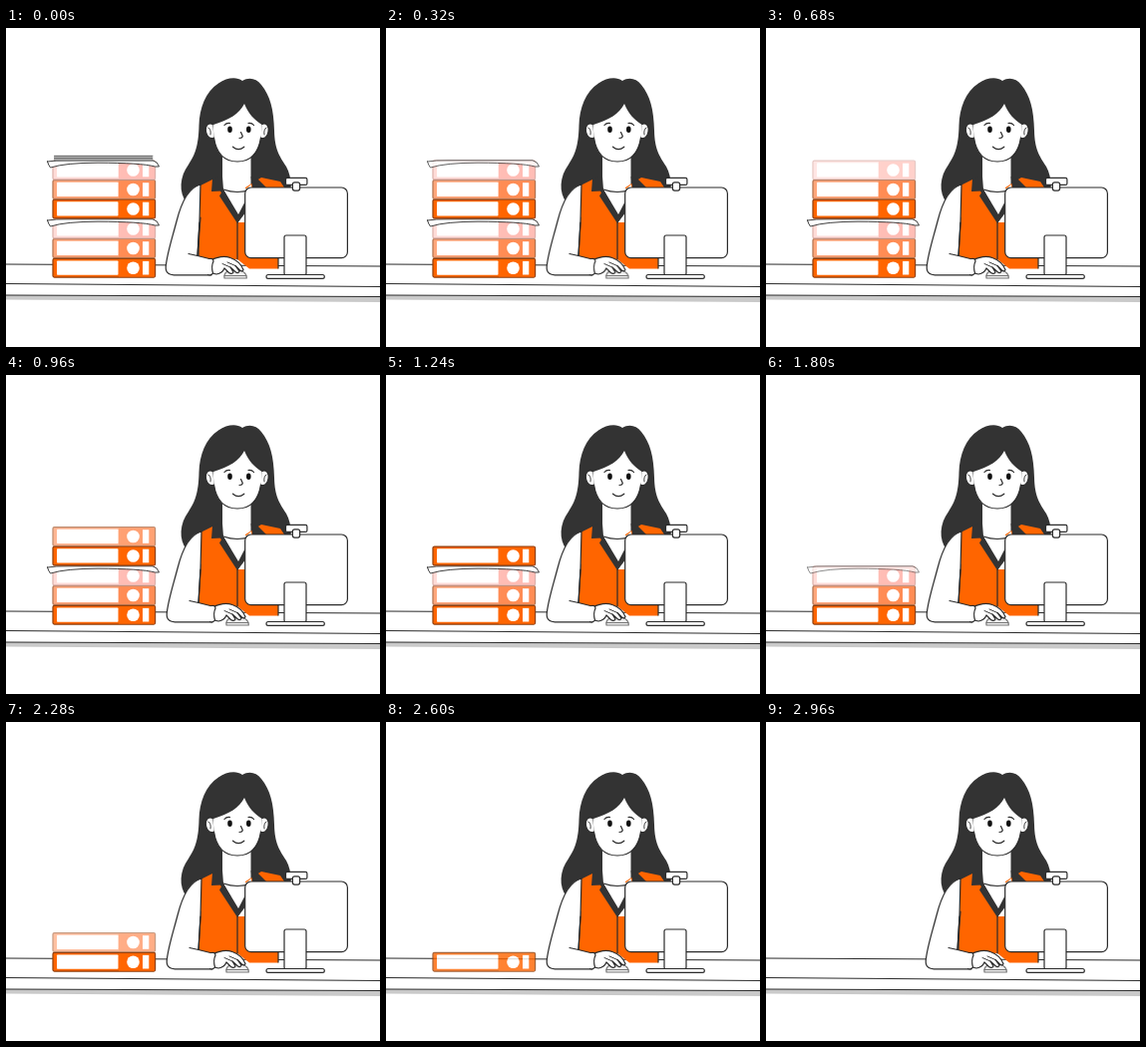
Animation of 375x320 px, one loop 3000 ms. Source, as an HTML page without scripts:

```html
<!DOCTYPE html>
<html lang="en">
<head>
<meta charset="utf-8">
<title>Clearing the desk</title>
<style>
html, body { margin: 0; width: 100%; height: 100%; overflow: hidden; background: #fff; }
svg { display: block; width: 375px; height: 320px; }
.ink { fill: none; stroke: #2b2b2b; stroke-width: 1.2; stroke-linecap: round; stroke-linejoin: round; }
.thin { stroke-width: .9; }
.paper { fill: #fff; }
.dark { fill: #333; }
.eye { fill: #111; }
.vest { fill: #ff6500; }
.mouse { fill: #eee; stroke: #777; }
.full { --body: #ff6500; --spine: #ff6500; --edge: #8f3d08; }
.mid { --body: #ffa77c; --spine: #ff8c54; --edge: #b0704c; }
.pale { --body: #ffdcd8; --spine: #ffbdb5; --edge: #dcb0aa; }
.body { fill: var(--body); stroke: var(--edge); stroke-width: 1.2; }
.spine { fill: var(--spine); }
.arm { animation: slide 3s infinite; --dx: 1px; }
.hand { animation: slide 3s infinite; --dx: 2px; }
@keyframes slide {
  0% { transform: none; animation-timing-function: ease-in-out; }
  14%, 88% { transform: translateX(var(--dx)); animation-timing-function: ease-in-out; }
  98.5%, 100% { transform: none; }
}
</style>
</head>
<body>
<svg viewBox="0 0 375 320">
  <defs>
    <g id="binder">
      <rect class="body" x="47" y=".6" width="102.6" height="18.8" rx="1.5"/>
      <rect class="spine" x="113" y="1.2" width="36" height="17.6"/>
      <rect class="paper" x="51" y="2.8" width="61.5" height="14.2" rx=".8"/>
      <circle class="paper" cx="127.5" cy="10" r="6.3"/>
      <rect class="paper" x="137" y="3.2" width="6.3" height="13.6"/>
    </g>
    <path id="sheet" class="ink paper thin" d="M41.500 1.500Q50 0 62 .3L147 .3Q152 1.500 153.500 6.500L149.500 6.500Q135 2.700 92 2.700Q60 2.700 44.500 7.500Q42.500 5 41.500 1.500Z"/>
  </defs>

  <!-- desk -->
  <path fill="#c9c9c9" d="M0 268L375 269.500V275L0 272.500Z"/>
  <path class="ink paper" d="M-2 237L377 239V269.500L-2 268Z"/>
  <path class="ink" d="M-2 256.500L377 259.500"/>

  <!-- hair, neck and face -->
  <path class="dark" d="M237 53C231 48.500 221 50 213 55.500C200 64 194 80 193.500 98C193 119 189 128 183 137C174 149 173 165 181 175H283C287 164 287 150 281 139C274 128 269.500 122 269 103C268.500 82 265 68 256 57C251 50 243 49 237 53Z"/>
  <path class="paper" d="M217 128H245.500V160L236 182L217 160Z"/>
  <path class="ink paper" d="M208 97C203 94 199.500 98 200.500 104C201.500 109.500 205 112 209 110ZM256 97C260.500 94 264 98 263 104C262 109.500 259 112 255 110Z"/>
  <path class="ink thin" d="M203 100Q206 102 205 107M261 100Q258 102 259 107"/>
  <path class="paper" d="M239 76C234 86 224 92 208 97C207.500 116 212 134 232 134C250 134 257 116 256.500 97C249 92 243 86 239 76Z"/>
  <path class="ink" d="M208.500 110C211 126 219 134 232 134C245 134 253 126 255.500 110"/>
  <ellipse class="eye" cx="224.500" cy="101.800" rx="2.300" ry="3.200"/>
  <ellipse class="eye" cx="243.300" cy="101.800" rx="2.300" ry="3.200"/>
  <path class="ink" d="M219 97.500Q221 95 224.500 95.500M243 95.500Q246.500 95 248.500 97.500M235.500 104.500L237.300 108.500Q237 110.500 234 110.500M227.500 119.200Q233 124 238.800 119.200"/>

  <!-- torso -->
  <path class="vest" d="M207 152L195 158L193 232H232L244 241.500H273V160H279L275 154L256 150L240 160V195H232L213 160Z"/>
  <path class="paper" d="M217 156Q231 171 246 157L247 167L234 190L218 162Z"/>
  <path class="ink" d="M218 162Q232 167 246 162"/>
  <path class="dark" d="M207 151L217 149L218 162L233 187L247 160L245.500 149L253 152L261 160H247L241 184L232 196L214 168.500L217 163.500L206 164Z"/>
  <path class="ink" d="M232 195V232M195 190Q193 212 193 231M273 231V241"/>

  <!-- arm and mouse -->
  <g class="arm">
    <path class="ink paper" d="M195 157C183 160 176 174 171 194C166 213 161 228 160.200 240C160 246 164 247.800 171 247.800H206V232L192 228.500L194 195Z"/>
    <path class="ink" d="M194 195L192 228.500L183 226.500"/>
  </g>
  <g class="hand">
    <path class="ink mouse" d="M219 251C218 245 223 242.500 230 242.500C237 242.500 241.500 246 241.300 251Z"/>
    <path class="ink mouse" d="M219 248.500H241"/>
    <path class="ink paper" d="M205 233C212 229.500 220 228.500 225 230.500C232 233 236 237.500 238 242.500Q237 245 234.500 243L230 238.500L234 244Q233 246.500 230.500 245L225 240L228 245Q226.500 247.500 223.500 245.500L219 241Q217 246 211 247L205 245.500Z"/>
    <path class="ink thin" d="M222 235L230 238.500M217 236.500L225 240"/>
    <path class="ink paper" d="M203.500 231.500Q208 230.500 208 234Q205.500 239 207.500 246Q206 248.500 202.500 247.500"/>
  </g>

  <!-- monitor -->
  <rect class="ink paper" x="239.700" y="160" width="102.700" height="70.700" rx="6"/>
  <rect class="ink paper" x="279" y="208" width="22" height="40" rx="2"/>
  <rect class="ink paper" x="261" y="247.500" width="58.300" height="3.800" rx="1.900"/>
  <rect class="ink paper" x="280.500" y="150.400" width="21.400" height="7" rx="1.500"/>
  <rect class="ink paper" x="287.400" y="154.800" width="7.200" height="8.300" rx="2"/>

  <!-- stack, bottom to top -->
  <g class="full">
    <use href="#binder" y="230.700"/>
    <animate attributeName="opacity" values="1;1;0;0" keyTimes="0;.845;.96;1" dur="3s" repeatCount="indefinite"/>
  </g>
  <g class="mid">
    <use href="#binder" y="211"/>
    <animate attributeName="opacity" values="1;1;0;0" keyTimes="0;.727;.84;1" dur="3s" repeatCount="indefinite"/>
  </g>
  <g class="pale">
    <use href="#binder" y="191.500"/>
    <animate attributeName="opacity" values="1;1;0;0" keyTimes="0;.64;.735;1" dur="3s" repeatCount="indefinite"/>
  </g>
  <g>
    <use href="#sheet" y="191.500"/>
    <animate attributeName="opacity" values="1;1;0;0" keyTimes="0;.56;.66;1" dur="3s" repeatCount="indefinite"/>
  </g>
  <g class="full">
    <use href="#binder" y="171.500"/>
    <animate attributeName="opacity" values="1;1;0;0" keyTimes="0;.415;.53;1" dur="3s" repeatCount="indefinite"/>
  </g>
  <g class="mid">
    <use href="#binder" y="152"/>
    <animate attributeName="opacity" values="1;1;0;0" keyTimes="0;.3;.41;1" dur="3s" repeatCount="indefinite"/>
  </g>
  <g class="pale">
    <use href="#binder" y="132.500"/>
    <animate attributeName="opacity" values="1;1;0;0" keyTimes="0;.195;.3;1" dur="3s" repeatCount="indefinite"/>
  </g>
  <g>
    <use href="#sheet" y="132.500"/>
    <animate attributeName="opacity" values="1;1;0;0" keyTimes="0;.09;.185;1" dur="3s" repeatCount="indefinite"/>
  </g>
  <g>
    <rect x="48" y="128" width="99" height="5" rx="1" fill="#bbb"/>
    <path class="ink thin" stroke-opacity=".75" d="M48.500 128.300H147M48.500 130.700H147M48.500 133H147"/>
    <animate attributeName="opacity" values="1;1;0;0" keyTimes="0;.01;.1;1" dur="3s" repeatCount="indefinite"/>
  </g>
</svg>
</body>
</html>
```
